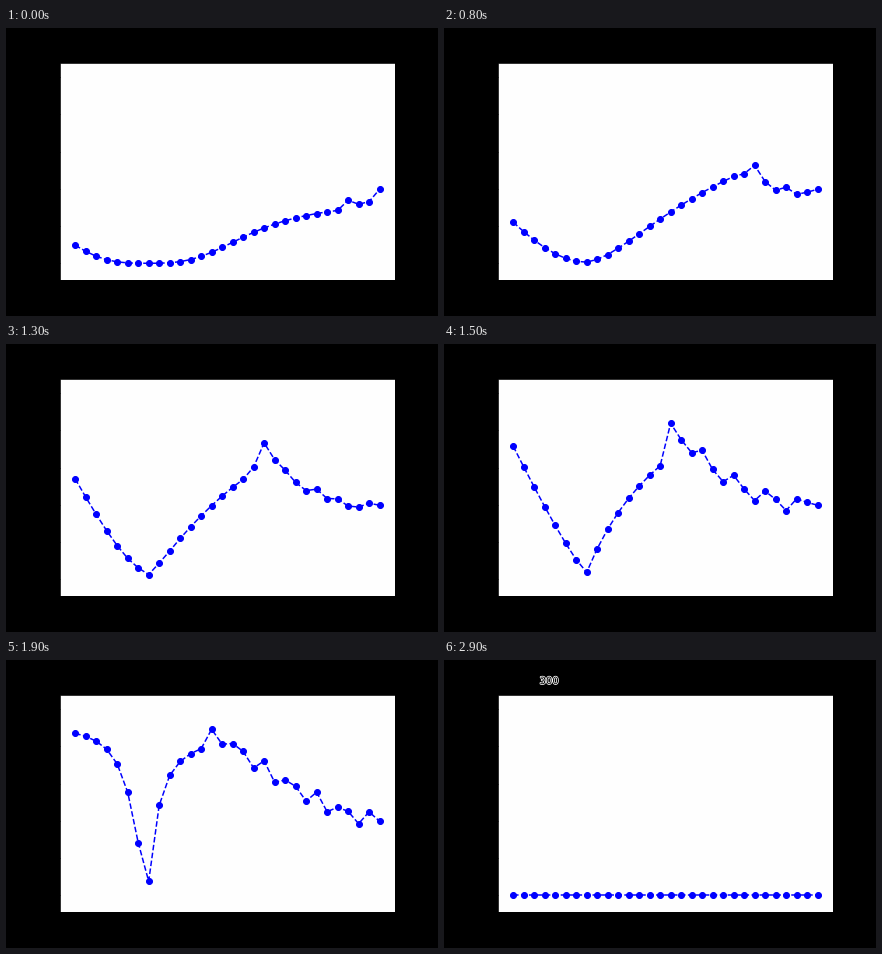
Write a matplotlib script that moves like this. It is 432x288 px and loops after 3 s.

```python
import numpy as np
import matplotlib.pyplot as plt
from matplotlib import patheffects
from matplotlib.animation import FuncAnimation

W, H, DPI = 432, 288, 72
FRAMES, STEP_MS = 30, 100
LAST_CURVE = 20          # after this the series drops to zero
N = 30
DIP = 7                  # index of the fixed valley
END_HEIGHT = 74
index = np.arange(N)


def grow(d, span, height, power, knee):
    """Power-law rise that bends over past the knee and reaches height at span."""
    hill = lambda x: x**power / (x**power + knee**power)
    return height * hill(d) / hill(span)


def pose(low, left, rise, crest, ripple):
    """Heights above zero, in pixels: valley, climb to the crest, rippling fall.

    left and rise are (height, power, knee), crest is (index, height, falloff),
    ripple is (size, period).
    """
    peak, top, falloff = crest
    size, period = ripple
    d = np.abs(index - DIP).astype(float)
    h = low + np.where(index < DIP, grow(d, DIP, *left), grow(d, peak - DIP, *rise))

    fall = index >= peak
    u = (N - 1 - index[fall]) / (N - 1 - peak)
    wave = size * np.cos(2 * np.pi * (index[fall] - peak) / period)
    wave[[0, -1]] = 0
    h[fall] = END_HEIGHT + (top - END_HEIGHT) * u**falloff + wave
    return h


start = dict(low=0, left=(18, 3.3, 10), rise=(54, 3, 10),
             crest=(26, 63, 0.5), ripple=(12, 3))
early = dict(low=0, left=(26, 2.4, 12), rise=(77, 2, 12.5),
             crest=(26, 83, 6), ripple=(14, 3))
middle = dict(low=3, left=(64, 1.5, 99), rise=(105, 1.3, 16),
              crest=(21, 115, 4), ripple=(6, 4))
steep = dict(low=7, left=(126, 1.2, 99), rise=(115, 1, 10),
             crest=(15, 156, 2.3), ripple=(8, 3.1))
late = dict(low=14, left=(148, 2, 1.75), rise=(136, 1.2, 1),
            crest=(13, 166, 1.5), ripple=(8, 2.5))
final = dict(late, left=(155, 2, 1.6), crest=(13, 178, 1.5))

stages = [start, early, middle, steep, late, final]
times = np.array([0, 4, 11, 15, 19, LAST_CURVE], float)
peaks = [s["crest"][0] for s in stages]
poses = [pose(**s) for s in stages]


def anchors(peak):
    return [0, DIP, peak, N - 1]


def aligned(heights, own_peak, peak):
    """Slide a pose sideways so that its peak lands on the given index."""
    where = np.interp(index, anchors(peak), anchors(own_peak))
    return np.interp(where, index, heights)


def curve(t):
    if t > LAST_CURVE:
        return np.zeros(N)
    peak = round(float(np.interp(t, times, peaks)))
    keys = np.array([aligned(p, q, peak) for p, q in zip(poses, peaks)])
    slopes = np.gradient(keys, times, axis=0)
    k = min(np.searchsorted(times, t, side="right") - 1, len(times) - 2)
    span = times[k + 1] - times[k]
    s = (t - times[k]) / span
    # Cubic Hermite blend between neighbouring poses
    return ((2 * s**3 - 3 * s**2 + 1) * keys[k]
            + (s**3 - 2 * s**2 + s) * span * slopes[k]
            + (3 * s**2 - 2 * s**3) * keys[k + 1]
            + (s**3 - s**2) * span * slopes[k + 1])


fig = plt.figure(figsize=(W / DPI, H / DPI), dpi=DPI, facecolor="black")
ax = fig.add_axes([0.125, 0.125, 0.775, 0.755], facecolor="#fefefe")
height = 0.755 * H
ax.set_ylim(-height / 13, height * 12 / 13)
ax.set_xlim(-0.05 * (N - 1), 1.05 * (N - 1))
ax.set_xticks([])
ax.set_yticks(np.arange(6) * 37.2, [""] * 6)

line, = ax.plot(index, curve(0), "--o", color="#0000ff", lw=1.5, ms=6)
label = fig.text(105 / W, 1 - 24 / H, "300", size=10, color="black",
                 ha="center", va="baseline", visible=False)
label.set_path_effects([patheffects.withStroke(linewidth=1.5, foreground="white")])


def update(i):
    line.set_ydata(curve(i))
    label.set_visible(i == FRAMES - 1)
    return line, label


anim = FuncAnimation(fig, update, frames=FRAMES, interval=STEP_MS, repeat=True)
plt.show()
```
